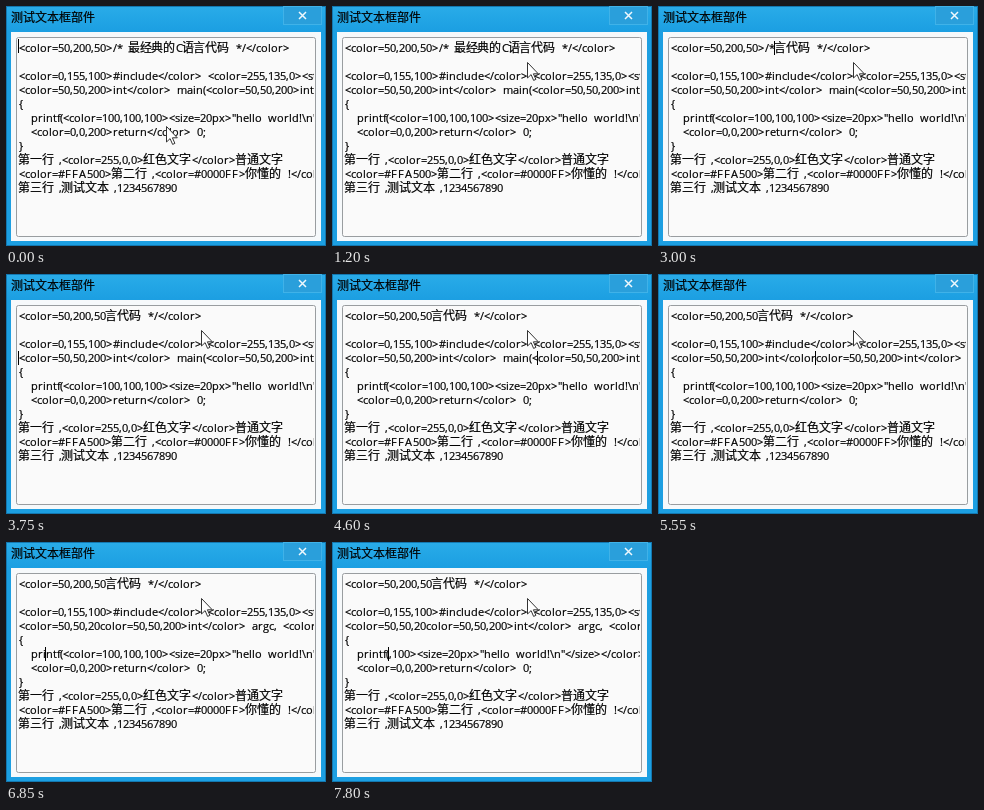
These frames come from a looping animation (320x240 px, 8000 ms). An HTML page:

```html
<!DOCTYPE html>
<html lang="zh">
<head>
<meta charset="utf-8">
<title>测试文本框部件</title>
<style>
  html, body { margin: 0; width: 100%; height: 100%; overflow: hidden; }
  svg { display: block; }
  text { fill: #000; stroke: #000; stroke-width: .2px; }
  .latin { font: 11px "Open Sans", "Noto Sans", sans-serif; }
  .cjk { font: 12px "Noto Sans CJK SC", "Noto Sans CJK", sans-serif; }
</style>
</head>
<body>
<svg id="stage" width="320" height="240" viewBox="0 0 320 240">
  <defs>
    <linearGradient id="frame" x2="0" y2="1">
      <stop offset="0" stop-color="#29abe8"/>
      <stop offset=".1" stop-color="#1c9fe2"/>
      <stop offset="1" stop-color="#1c9fe2"/>
    </linearGradient>
    <clipPath id="view"><rect x="11" y="32" width="297" height="198"/></clipPath>
  </defs>
  <rect width="320" height="240" fill="#1478b0"/>
  <rect x="1" y="1" width="318" height="238" fill="url(#frame)"/>
  <rect x="277.5" y=".5" width="38" height="18" fill="#2a9fdb" stroke="#40b2e8"/>
  <path d="M293 6l7 7M300 6l-7 7" stroke="#eef8fd" stroke-width="1.5"/>
  <text class="cjk" x="5" y="16">测试文本框部件</text>
  <rect x="5" y="26" width="310" height="209" fill="#f6f9fb"/>
  <rect x="10.5" y="31.5" width="299" height="199" rx="2" fill="#fafafa" stroke="#999da0"/>
  <g id="lines" clip-path="url(#view)"></g>
  <rect id="caret" width="1" height="14"/>
  <path id="mouse" d="M.5 .5V16L4.1 12.6 6.6 18.4 8.9 17.4 6.4 11.8H11.3Z" fill="#fff" stroke="#333"/>
</svg>
<script>
const LOOP = 8000, LEFT = 12, TOP = 35, ROW = 14;
const THIN = '\u2009';
const TEXT = [
  '<color=50,200,50>/* 最经典的C语言代码 */</color>',
  '',
  '<color=0,155,100>#include</color> <color=255,135,0><stdio.h></color>',
  '<color=50,50,200>int</color> main(<color=50,50,200>int</color> argc, <color=50,50,200>char</color> *argv[])',
  '{',
  '  printf(<color=100,100,100><size=20px>"hello world!\\n"</size></color>);',
  '  <color=0,0,200>return</color> 0;',
  '}',
  `第一行${THIN},<color=255,0,0>红色文字</color>普通文字`,
  `<color=#FFA500>第二行${THIN},<color=#0000FF>你懂的 !</color>`,
  `第三行${THIN},测试文本${THIN},1234567890`
];

// Edits: [start, interval, count, action, row, column]
const EDITS = [
  [1500, 0, 1, 'go', 0, 26],
  [1650, 150, 3, 'back'], [2250, 0, 1, 'back'], [2550, 0, 1, 'back'],
  [2750, 0, 1, 'back'], [3000, 0, 1, 'back'], [3200, 100, 2, 'back'], [3450, 0, 1, 'back'],
  [3600, 0, 1, 'go', 1, 0], [3650, 0, 1, 'go', 2, 0], [3700, 0, 1, 'go', 3, 0],
  [3790, 23.8, 35, 'right'],
  [4800, 80, 4, 'back'], [5300, 50, 3, 'back'], [5550, 62.5, 13, 'back'],
  [6550, 0, 1, 'go', 4, 1], [6650, 0, 1, 'go', 5, 1],
  [6700, 0, 1, 'right'], [6850, 0, 3, 'right'], [6900, 50, 4, 'right'],
  [7150, 50, 14, 'del']
];

const $ = id => document.getElementById(id);
const isCjk = ch => ch > '\u2e80';

// Whole-pixel advances; a few hinted glyphs differ from plain rounding.
const hinted = { ' ': 6, [THIN]: 4, '>': 7, r: 5, f: 3, F: 7, A: 8, 经: 11, 语: 11 };
const ruler = document.createElement('canvas').getContext('2d');
ruler.font = '11px "Open Sans", "Noto Sans", sans-serif';
const advances = {};
function advance(ch) {
  return advances[ch] ??= hinted[ch] ?? (isCjk(ch) ? 12 : Math.round(ruler.measureText(ch).width));
}
function columnX(line, col) {
  let x = LEFT;
  for (const ch of line.slice(0, col)) x += advance(ch);
  return x;
}

function addText(cls, row) {
  const el = document.createElementNS('http://www.w3.org/2000/svg', 'text');
  el.setAttribute('class', cls);
  el.setAttribute('y', TOP + 11 + row * ROW);
  return $('lines').appendChild(el);
}
const rows = TEXT.map((_, i) => ({ latin: addText('latin', i), cjk: addText('cjk', i), shown: null }));

function drawLine(row, line) {
  if (row.shown === line) return;
  row.shown = line;
  const runs = { latin: { s: '', x: [] }, cjk: { s: '', x: [] } };
  let x = LEFT;
  for (const ch of line) {
    if (ch.trim()) {
      const wide = isCjk(ch), run = runs[wide ? 'cjk' : 'latin'];
      run.s += ch;
      run.x.push(wide ? x : x + 1);
    }
    x += advance(ch);
  }
  for (const cls in runs) {
    row[cls].setAttribute('x', runs[cls].x.join(' '));
    row[cls].textContent = runs[cls].s;
  }
}

function stateAt(t) {
  const lines = [...TEXT];
  let row = 0, col = 0;
  const cut = at => { lines[row] = lines[row].slice(0, at) + lines[row].slice(at + 1); };
  for (const [start, gap, count, action, r, c] of EDITS) {
    for (let k = 0; k < count && start + k * gap <= t; k++) {
      if (action === 'go') { row = r; col = c; }
      else if (action === 'right') col++;
      else if (action === 'back') cut(--col);
      else cut(col);
    }
  }
  return { lines, row, col };
}

function render(t) {
  const { lines, row, col } = stateAt(t);
  lines.forEach((line, i) => drawLine(rows[i], line));

  const visible = t < 200 || (t >= 500 && t < 950) || t >= 1500;
  $('caret').setAttribute('x', columnX(lines[row], col));
  $('caret').setAttribute('y', TOP + row * ROW - (t < 1500 ? 2 : 0));
  $('caret').setAttribute('visibility', visible ? 'visible' : 'hidden');

  const p = Math.min(1, Math.max(0, (t - 660) / 540));
  const e = p * p * (3 - 2 * p);
  $('mouse').setAttribute('transform', `translate(${Math.round(160 + 35 * e)} ${Math.round(120 - 64 * e)})`);
}

const began = performance.now();
function tick() {
  render((performance.now() - began) % LOOP);
  requestAnimationFrame(tick);
}
tick();
</script>
</body>
</html>
```
